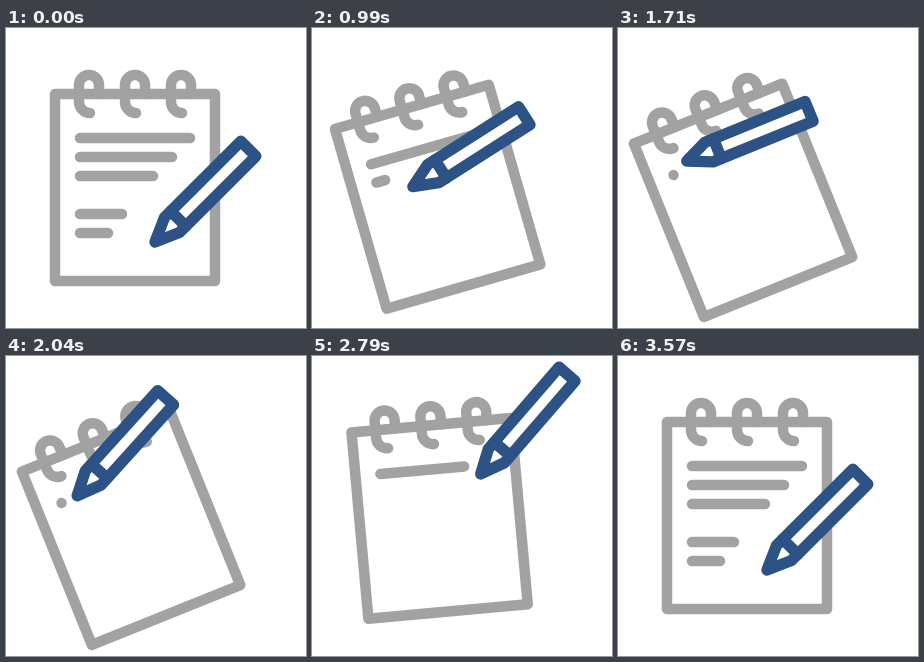
Animation, 300 px wide and 300 px high, one loop 3.6 s. Source, as an HTML page with a canvas:

```html
<!DOCTYPE html>
<html>
<head>
<meta charset="utf-8">
<style>
  html, body { margin: 0; width: 300px; height: 300px; overflow: hidden; background: #fff; }
  canvas { display: block; }
</style>
</head>
<body>
<canvas id="stage" width="300" height="300"></canvas>
<script>
const ctx = document.getElementById('stage').getContext('2d');
const LOOP = 3600, GREY = '#a2a2a2', BLUE = '#2c5286';
const PIVOT = [160, 176], TILT = -22;

const lines = [[110, 110], [129, 92], [148, 73], [186, 42], [205, 28]]; // y, length
const inkTotal = lines.reduce((sum, [, length]) => sum + length, 0);

// time, tip x, tip y, angle relative to the pad, sideways bow of the path that follows
const penKeys = [
  [0, 149, 214, -45, -5],
  [1690, 91.5, 102, 0, 0],
  [2320, 91, 114, -44, 0],
  [2800, 174, 119, -44, 0],
  [3300, 149, 214, -45, 0],
  [LOOP, 149, 214, -45, 0]
];

const rings = new Path2D();
for (const x of [73, 119, 165]) {
  rings.addPath(new Path2D(`M${x + 20} 66V57a10 10 0 0 0-20 0V74a11 11 0 0 0 11 11`));
}
const penBody = new Path2D('M0 0L24-10.6H132V10.6H24Z');
const penBand = new Path2D('M33-10.6V10.6');

const span = (t, from, to) => Math.min(1, Math.max(0, (t - from) / (to - from)));
const cubic = x => x < 0.5 ? 4 * x ** 3 : 1 - 4 * (1 - x) ** 3;
const sine = x => (1 - Math.cos(Math.PI * x)) / 2;
const rotate = degrees => ctx.rotate(degrees * Math.PI / 180);

function penPose(t) {
  const i = penKeys.findIndex(key => key[0] > t);
  const [a, b] = [penKeys[i - 1], penKeys[i]];
  const k = sine(span(t, a[0], b[0]));
  const [, x, y, angle] = a.map((v, n) => v + (b[n] - v) * k);
  return [x + a[4] * Math.sin(Math.PI * k), y, angle];
}

function drawPad(t) {
  ctx.lineWidth = 10.5;
  ctx.strokeStyle = GREY;
  ctx.strokeRect(49, 66, 160, 187);
  ctx.stroke(rings);

  const shown = t < 1800 ? 1 - cubic(span(t, 108, 1690)) : span(t, 2060, 3540) ** 2;
  let ink = Math.max(0.01, shown * inkTotal);
  for (const [y, length] of lines) {
    if (ink <= 0) break;
    ctx.beginPath();
    ctx.moveTo(74, y);
    ctx.lineTo(74 + Math.min(length, ink), y);
    ctx.stroke();
    ink -= length;
  }
}

function drawPen(t) {
  const [x, y, angle] = penPose(t);
  ctx.translate(x, y);
  rotate(angle);
  ctx.lineWidth = 11.4;
  ctx.fillStyle = '#fff';
  ctx.strokeStyle = BLUE;
  ctx.fill(penBody);
  ctx.stroke(penBody);
  ctx.stroke(penBand);
}

function draw(now) {
  const t = now % LOOP;
  ctx.clearRect(0, 0, 300, 300);
  ctx.save();
  ctx.lineCap = ctx.lineJoin = 'round';
  ctx.translate(...PIVOT);
  rotate(TILT * (cubic(span(t, 150, 1570)) - cubic(span(t, 1960, 3320))));
  ctx.translate(-PIVOT[0], -PIVOT[1]);
  drawPad(t);
  drawPen(t);
  ctx.restore();
}

const start = performance.now();
function tick() {
  draw(performance.now() - start);
  requestAnimationFrame(tick);
}
tick();
</script>
</body>
</html>
```
